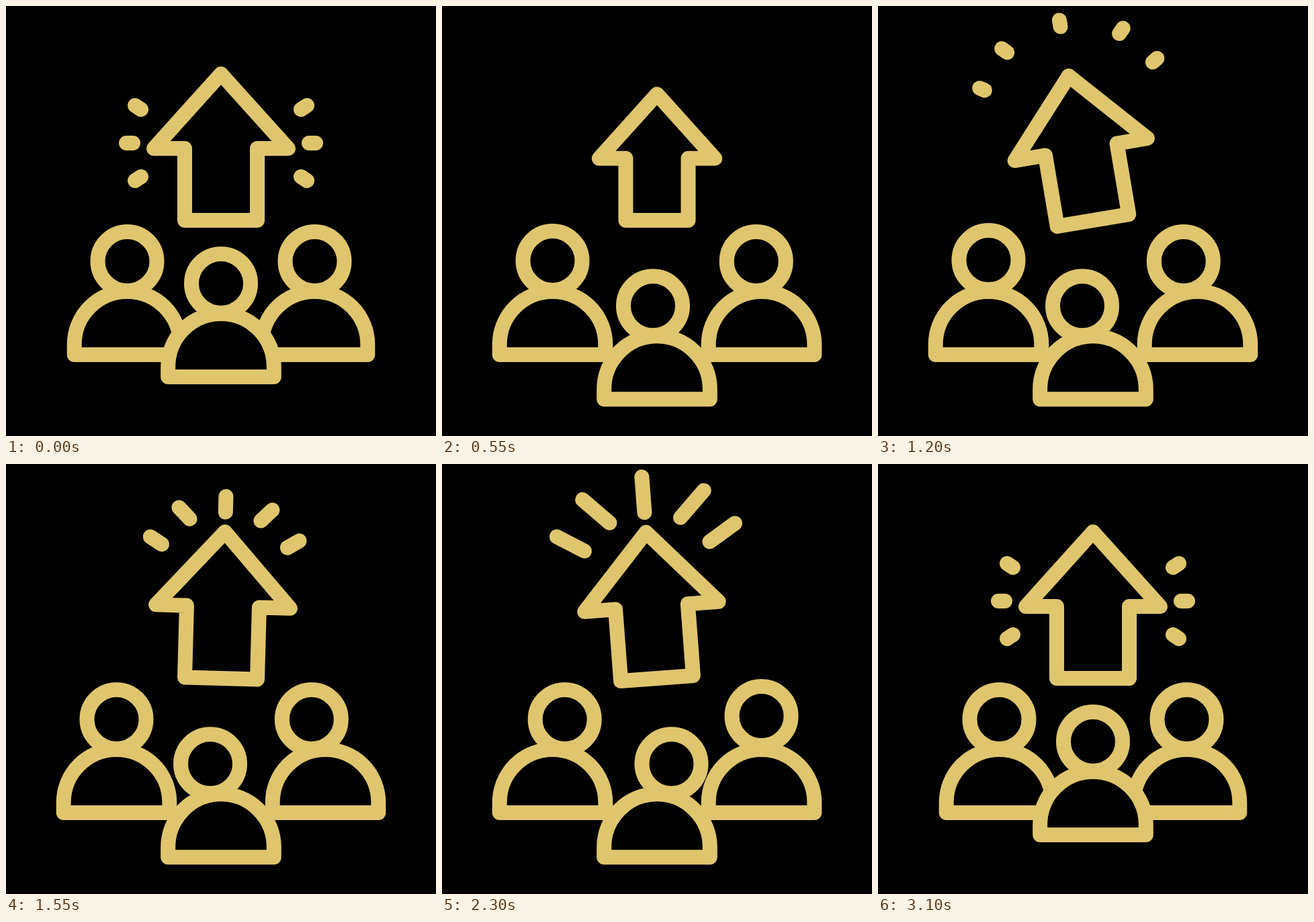
These frames come from a looping animation (640x640 px, 3.4 s). An HTML page:

```html
<!DOCTYPE html>
<html lang="en">
<head>
<meta charset="utf-8">
<title>Team growth</title>
<style>
  html, body { margin: 0; width: 100%; height: 100%; overflow: hidden; background: #000; }
  svg { display: block; width: 100%; height: 100%; }
</style>
</head>
<body>
<svg viewBox="0 0 640 640" fill="#000" stroke="#dfc56e" stroke-width="22" stroke-linecap="round" stroke-linejoin="round">
  <g id="people"></g>
  <g id="arrow"><path id="outline"/></g>
  <g id="dashes" transform="translate(320 204)"></g>
</svg>
<script>
const LOOP = 3400, STEP = 50;
const $ = id => document.getElementById(id);

function add(parent, tag, attrs = {}) {
  const el = document.createElementNS("http://www.w3.org/2000/svg", tag);
  for (const k in attrs) el.setAttribute(k, attrs[k]);
  return parent.appendChild(el);
}

const move = (el, x, y) => el.setAttribute("transform", `translate(${x} ${y})`);
const clamp = u => Math.min(1, Math.max(0, u));

// Smooth step from 0 to 1 between two times
function ease(t, from, to) {
  const u = clamp((t - from) / (to - from));
  return u * u * (3 - 2 * u);
}

// A side person only turns inwards; the middle one turns both ways
function makePerson(side, left, right, liftStart) {
  const group = add($("people"), "g");
  const head = add(group, "circle", { cy: -139, r: 44 });
  add(group, "path", { d: "M-78.8 0V-15.2A78.8 78.8 0 0 1 78.8 -15.2V0Z" });
  return { side, left, right, liftStart, group, head };
}
const people = [
  makePerson(-1, 0, 18.2, 500),
  makePerson(1, -20.7, 0, 1850),
  makePerson(0, -16, 21.5)
];

// A ray is a line from an inner to an outer point
const makeRay = (parent, x0, y0, x1, y1) => ({ x0, y0, x1, y1, el: add(parent, "line") });
const rays = [makeRay($("arrow"), 0, -247.5, 0, -302)];
const dashes = [];
for (const m of [-1, 1]) {
  rays.push(makeRay($("arrow"), m * 53, -236, m * 91.5, -274.5));
  rays.push(makeRay($("arrow"), m * 93.5, -197, m * 134, -222));
  for (const i of [-1, 0, 1]) {
    const tilt = Math.abs(i);
    dashes.push(makeRay($("dashes"), m * (131 - 12 * tilt), 50 * i, m * (141 - 13 * tilt), 56 * i));
  }
}

// Show only the part of each ray between two fractions of its length
function trim(list, from, to) {
  for (const { x0, y0, x1, y1, el } of list) {
    el.style.display = to - from < 0.02 ? "none" : "";
    [from, to].forEach((u, i) => {
      el.setAttribute("x" + (i + 1), x0 + (x1 - x0) * u);
      el.setAttribute("y" + (i + 1), y0 + (y1 - y0) * u);
    });
  }
}

function drawPeople(t) {
  const home = ease(t, 2670, 3100);
  const spread = ease(t, 0, 388) - home;
  const lookLeft = ease(t, 400, 760) - ease(t, 1600, 2000);
  const lookRight = ease(t, 1600, 2000) - home;
  for (const { side, left, right, liftStart, group, head } of people) {
    const lift = side ? 5 * Math.sin(Math.PI * clamp((t - liftStart) / 800)) : 0;
    move(group, 320 + side * (139.5 + 16 * spread), side ? 519 : 552 + 33.3 * spread);
    move(head, left * lookLeft + right * lookRight, -lift);
  }
}

function drawArrow(t) {
  const s = 1 - 0.248 * ease(t, 0, 388) + 0.26 * ease(t, 388, 750) - 0.012 * ease(t, 750, 950);
  const angle = -9.6 * ease(t, 800, 1180) + 14.6 * ease(t, 1180, 1720)
    - 9.4 * ease(t, 1720, 2250) + 4.4 * ease(t, 2250, 2850);
  const tip = -218 * s, wing = 100 * s, neck = -107 * s, half = 54 * s;
  $("outline").setAttribute("d",
    `M0 ${tip}L${wing} ${neck}H${half}V0H${-half}V${neck}H${-wing}Z`);
  $("arrow").setAttribute("transform", `translate(320 319) rotate(${angle})`);
}

function drawRays(t) {
  // Three bursts: each ray grows outwards, then empties from the inside
  const burst = t < 800 || t >= 2765 ? 0 : (t - 800) % 655;
  trim(rays, ease(burst, 210, 470), ease(burst, 0, 210));

  if (t < 2800) trim(dashes, ease(t, 0, 200), 1);
  else trim(dashes, 0, ease(t, 2850, 3100));
}

const start = performance.now();
function frame() {
  const t = Math.floor((performance.now() - start) % LOOP / STEP) * STEP;
  drawPeople(t);
  drawArrow(t);
  drawRays(t);
  requestAnimationFrame(frame);
}
frame();
</script>
</body>
</html>
```
